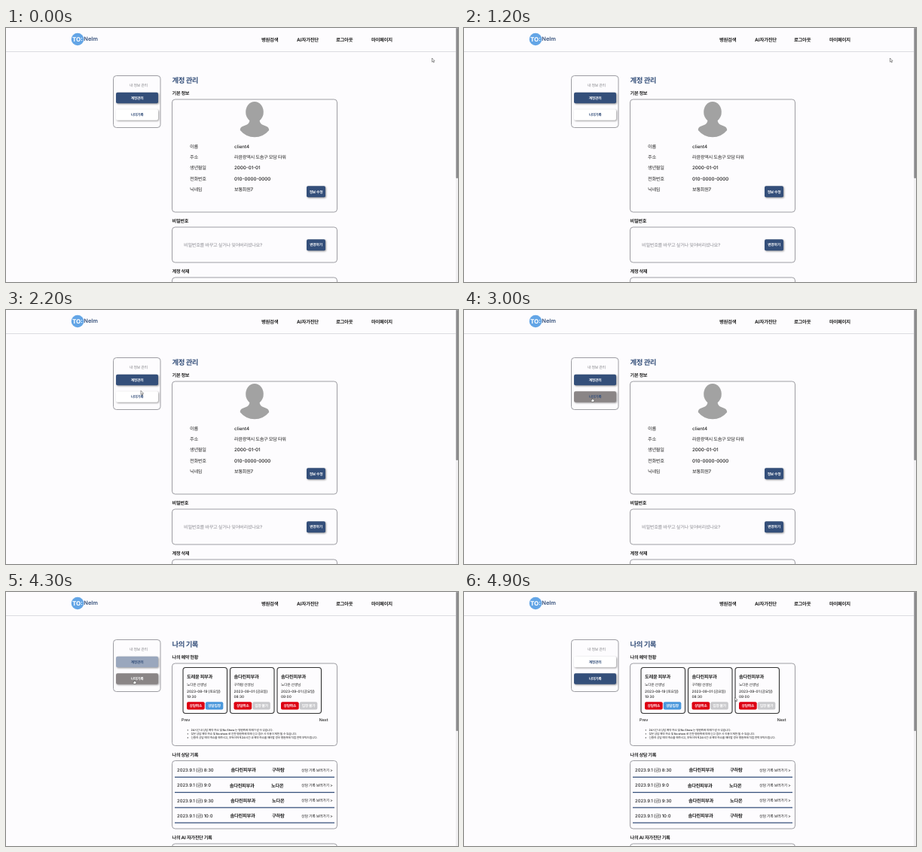
An HTML page for the animation above (5000 ms loop, 600x338 px).

```html
<!DOCTYPE html>
<html>
<head>
<meta charset="utf-8">
<style>
html, body { margin: 0; width: 100%; height: 100%; overflow: hidden; background: #fdfcfe; }
svg { display: block; width: 100vw; height: 100vh; }
text { font-family: Inter, "Noto Sans CJK KR", "Noto Sans CJK", sans-serif; word-spacing: -.05em; text-rendering: geometricPrecision; }
.ko { letter-spacing: -.05em; }
.raised { filter: drop-shadow(1.1px 1.1px .8px rgba(0, 0, 0, .4)); }
</style>
</head>
<body>
<svg id="stage" viewBox="0 0 600 338"></svg>
<script>
const NAVY = '#344f7a', INK = '#222', GREY = '#8e8e95';

// cy is the middle of the line of text
function text(x, cy, size, str, { w = 500, fill = INK, anchor = 'start', id = '' } = {}) {
  const body = str.replace(/>/g, '&gt;').replace(/[가-힣]+/g, '<tspan class="ko">$&</tspan>');
  return `<text id="${id}" x="${x}" y="${cy + size * .37}" font-size="${size}" font-weight="${w}" fill="${fill}" text-anchor="${anchor}">${body}</text>`;
}
const rect = (x, y, w, h, r, attrs) =>
  `<rect x="${x}" y="${y}" width="${w}" height="${h}" rx="${r}" ${attrs}/>`;
const panel = (x, y, w, h) => rect(x, y, w, h, 4, 'fill="none" stroke="#929298" stroke-width=".9"');
const button = (x, y, w, h, label, fill, { size = 4.8, id = '', raised = true, color = '#fff' } = {}) =>
  rect(x, y, w, h, 2, `id="${id}" fill="${fill}" class="${raised ? 'raised' : ''}"`) +
  text(x + w / 2, y + h / 2, size, label, { w: 700, fill: color, anchor: 'middle', id: id + 'Text' });
const title = str => text(220.5, 69.5, 9.4, str, { w: 600, fill: NAVY });
const section = (cy, str) => text(220.5, cy, 6.2, str, { w: 700 });

function frame() {
  const nav = [[339, '병원검색'], [386, 'AI자가진단'], [438, '로그아웃'], [485, '마이페이지']];
  return '<circle cx="95" cy="15" r="8.3" fill="#63a5e6"/>' +
    text(88, 14.7, 8, '<tspan fill="#fff">TO:</tspan>'.replace(/<[^>]*>/g, ''), { w: 700, fill: '#fff' }) +
    text(103.3, 14.7, 7.4, 'Nelm', { w: 600, fill: NAVY }) +
    nav.map(([x, s]) => text(x, 15.3, 6.4, s, { w: 700 })).join('') +
    '<path d="M0 31.5H597" stroke="#dcdce0"/>' +
    panel(142.5, 63.5, 62.5, 69) +
    text(176, 76.4, 5, '내 정보 관리', { fill: '#85858a', anchor: 'middle' }) +
    button(146, 85.7, 56, 14.6, '계정관리', NAVY, { id: 'account' }) +
    button(146, 108.2, 56, 14.6, '나의기록', '#fff', { id: 'record', color: NAVY }) +
    rect(597, 0, 3, 338, 0, 'fill="#f1f0f2"') +
    rect(597.4, 0, 2.6, 200, 1, 'id="thumb" fill="#8b8b8d"');
}

function accountPage() {
  const rows = [['이름', 'client4'], ['주소', '라윤광역시 도솜구 모담 타워'], ['생년월일', '2000-01-01'],
    ['전화번호', '010-0000-0000'], ['닉네임', '보통회원7']];
  return title('계정 관리') + section(87, '기본 정보') + panel(220.5, 95, 219, 150) +
    `<g fill="#a2a2a2"><ellipse cx="330" cy="111.7" rx="11.8" ry="13.8"/>
     <path d="M323.5 120C324.5 133 311 127 310.8 136Q318.5 145.3 330 145.3T349.2 136C349 127 335.5 133 336.5 120Z"/></g>` +
    rows.map(([k, v], i) => text(244, 157.3 + i * 14.45, 6.2, k) + text(303, 157.3 + i * 14.45, 6.2, v)).join('') +
    button(399, 210.3, 25, 15, '정보 수정', NAVY) +
    section(257, '비밀번호') + panel(220.5, 265, 219, 47) +
    text(236, 288.5, 6.2, '비밀번호를 바꾸고 싶거나 잊어버리셨나요?', { fill: GREY }) +
    button(399, 281.2, 25, 15, '변경하기', NAVY) +
    section(324, '계정 삭제') + panel(220.5, 332, 219, 50);
}

function recordPage() {
  const cards = [
    ['도레윤 피부과', '노다온', '2023-08-19 (토요일)', '19:30', '상담입장', '#4a98dc'],
    ['솜다린피부과', '구하람', '2023-09-01 (금요일)', '08:30', '입장 불가', '#c9c9cc'],
    ['솜다린피부과', '노다온', '2023-09-01 (금요일)', '09:00', '입장 불가', '#c9c9cc']];
  const notes = ['24시간 내 상담 예약 취소 및 No Show 는 병원측에 피해가 갈 수 있습니다.',
    '잦은 상담 예약 취소 및 No show 로 인한 병원측에 피해 신고 접수 시 이용이 제한 될 수 있습니다.',
    '신중히 상담 예약 취소를 해주시고, 부득이하게 24시간 내 예약 취소를 해야할 경우 병원측에 직접 연락 부탁드립니다.'];
  const visits = [['8:30', 298.5, 353, '구하람'], ['9:0', 296.7, 352, '노다온'],
    ['9:30', 298, 353, '노다온'], ['10:0', 297.5, 353, '구하람']];
  const flat = { size: 4.8, raised: false };
  return title('나의 기록') + section(87, '나의 예약 현황') + panel(220.5, 95, 219, 109.5) +
    cards.map(([clinic, doctor, date, time, label, fill], i) => {
      const x = 240 + i * 62.5;
      return rect(x - 5, 100.5, 58.5, 61, 3.5, 'fill="none" stroke="#333" stroke-width="1.1"') +
        text(x, 112.8, 6.3, clinic, { w: 700 }) + text(x, 123.3, 4.8, doctor + ' 선생님') +
        text(x, 131.8, 4.8, date) + text(x, 139.4, 4.8, time) +
        button(x, 146.2, 23.7, 10.2, '상담취소', '#dd0012', flat) +
        button(x + 24.8, 146.2, 23.5, 10.2, label, fill, flat);
    }).join('') +
    text(233, 170.5, 5.3, 'Prev') + text(427.5, 170.5, 5.3, 'Next', { anchor: 'end' }) +
    notes.map((s, i) => `<circle cx="241.3" cy="${183.8 + i * 5.05}" r=".65" fill="${INK}"/>` +
      text(245.5, 183.8 + i * 5.05, 3.72, s)).join('') +
    section(216.5, '나의 상담 기록') + panel(220.5, 224.5, 219, 90.5) +
    visits.map(([time, clinicX, doctorX, doctor], i) => {
      const y = 237 + i * 20.25;
      return text(227, y, 5.9, '2023.9.1 (금) ' + time) + text(clinicX, y, 6.3, '솜다린피부과', { w: 700 }) +
        text(doctorX, y, 6.3, doctor, { w: 700 }) +
        text(433.5, y, 5, '상담 기록 보러가기 >', { anchor: 'end' }) +
        `<path d="M224 ${y + 9.3}H436" stroke="${NAVY}" stroke-width="1.2"/>`;
    }).join('') +
    section(327, '나의 AI 자가진단 기록') + panel(220.5, 335, 219, 50);
}

const stage = document.getElementById('stage');
stage.innerHTML = frame() + `<g id="pageA">${accountPage()}</g><g id="pageB">${recordPage()}</g>
  <g id="cursor" fill="#fff" stroke="#444" stroke-width=".55" stroke-linejoin="round">
    <path id="arrow" d="M0 0V5.2L1.2 4.1 2 6 2.8 5.6 2 3.8H3.6Z"/>
    <path id="hand" d="M-.5 .5Q0-.2.5.5V2.3L2.6 2.8Q3.1 3 2.9 4L2.4 5.8H-.5L-1.9 3.7Q-1.8 3-.5 3.7Z"/>
  </g>`;
const $ = id => document.getElementById(id);
const set = (id, name, value) => $(id).setAttribute(name, value);
const show = (id, on) => set(id, 'display', on ? 'inline' : 'none');

const ramp = (t, a, b) => Math.min(1, Math.max(0, (t - a) / (b - a)));
const mix = (a, b, k) => `rgb(${a.map((v, i) => Math.round(v + (b[i] - v) * k))})`;
const white = [255, 255, 255], navy = [52, 79, 122], grey = [138, 133, 134];

// time, x, y
const path = [[0, 565.5, 40], [1900, 565.5, 40], [2000, 390, 72], [2100, 215, 101], [2200, 179, 107.3],
  [2400, 173, 114], [2800, 170, 116.5], [4400, 170, 116.5], [4600, 235, 125], [4800, 372, 145], [4900, 359.5, 140]];

function pointer(t) {
  const i = path.findIndex(p => p[0] > t);
  if (i < 0) return path[path.length - 1].slice(1);
  const [t0, x0, y0] = path[i - 1], [t1, x1, y1] = path[i], k = ramp(t, t0, t1);
  return [x0 + (x1 - x0) * k, y0 + (y1 - y0) * k];
}

function draw(now) {
  const t = Math.floor(now % 5000 / 100) * 100; // ten pictures a second
  const second = t >= 4300;
  show('pageA', !second);
  show('pageB', second);
  set('thumb', 'height', second ? 185 : 200);

  set('account', 'fill', second ? mix(navy, white, ramp(t, 4200, 4400)) : NAVY);
  set('accountText', 'fill', second ? NAVY : '#fff');
  set('record', 'fill', second ? mix(grey, navy, ramp(t, 4500, 4800)) : mix(white, grey, ramp(t, 2200, 2400)));
  set('recordText', 'fill', second ? '#fff' : NAVY);
  set('record', 'class', t >= 4000 && !second ? '' : 'raised');

  const [x, y] = pointer(t);
  const over = x > 146 && x < 202 && y > 108.2 && y < 122.8;
  set('cursor', 'transform', `translate(${x} ${y})`);
  show('arrow', !over);
  show('hand', over);
  requestAnimationFrame(draw);
}
draw(performance.now());
</script>
</body>
</html>
```
